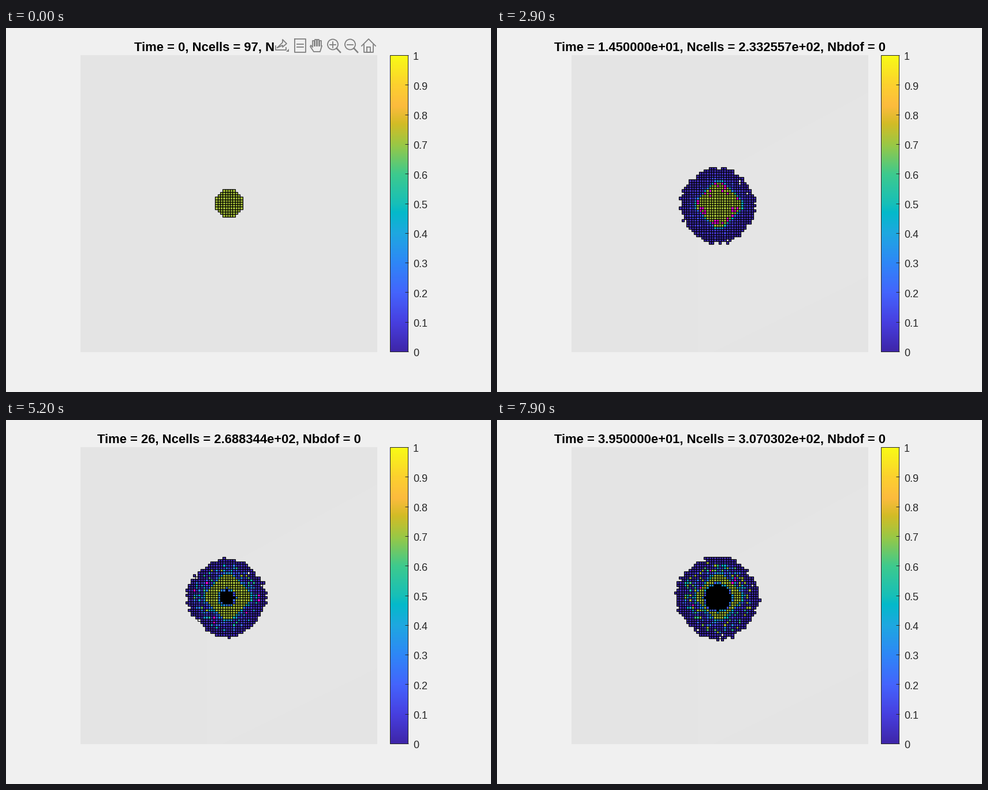
Recreate the animation shown at these times as a matplotlib script. Size 840x630 px, loop 8000 ms.

```python
import numpy as np
import matplotlib.pyplot as plt
from matplotlib.animation import FuncAnimation
from matplotlib.collections import PolyCollection
from matplotlib.colors import LinearSegmentedColormap
from matplotlib.patches import Circle, Polygon, Rectangle

W, H, DPI = 840, 630, 100
FRAMES, INTERVAL, DT = 80, 100, 0.5
PX = 72 / DPI
CX, CY, PITCH, HALF = 386, 304, 514 / 120, 21
INK, GREY = "#262626", "#808080"

parula = LinearSegmentedColormap.from_list("parula_like", [
    (0.0, "#3e26a8"), (0.1, "#473fe0"), (0.2, "#4464fd"), (0.3, "#2e87f7"),
    (0.4, "#1ea8e0"), (0.47, "#04b9ca"), (0.5, "#17bfb8"), (0.6, "#3dca8e"),
    (0.7, "#9ac845"), (0.77, "#d3bc26"), (0.83, "#fdbb3e"), (0.9, "#fcd02f"),
    (1.0, "#f9fb15")])
GREEN = (0.647, 0.753, 0.22, 1)
MAGENTA = (1, 0, 0.9, 1)
BLACK = (0, 0, 0, 1)
WHITE = (1, 1, 1, 1)

# Cell count at a few times
COUNT = [(0, 97), (3, 165), (8.5, 219.7494), (14.5, 233.2557), (18.5, 242.0435),
         (26, 268.8344), (31, 286.1106), (39.5, 307.0302)]

axis = np.arange(-HALF, HALF + 1)
X, Y = np.meshgrid(axis, axis)
RAD, ANG = np.hypot(X, Y), np.arctan2(Y, X)
rng = np.random.default_rng(7)
jitter, dice, level = (rng.random(X.shape) for _ in range(3))
clump = dice + 0.16 * (1 + np.sin(0.9 * X + 1) * np.cos(0.8 * Y))


def square(x, y):
    x0, x1 = (np.round(CX + (x + s) * PITCH) + 0.5 for s in (-0.5, 0.5))
    y0, y1 = (np.round(CY - (y + s) * PITCH) - 0.5 for s in (0.5, -0.5))
    return [(x0, y0), (x1, y0), (x1, y1), (x0, y1)]


SQUARES = np.array([square(x, y) for x, y in zip(X.ravel(), Y.ravel())])


def ramp(t, start, span):
    return np.clip((t - start) / span, 0, 1)


def bell(t, mid, width):
    return np.exp(-((t - mid) / width) ** 2)


def outline(t):
    """Colony radius: fast then slow growth, leaning to the lower left."""
    g = ramp(t, 0, 8.5)
    mean = 5.5 + 8.8 * g ** 0.6 + 0.068 * max(t - 8.5, 0)
    return mean + g * (1.4 * np.cos(ANG - 1.25 * np.pi) + 0.4 * np.cos(4 * ANG)
                       + 1.4 * (jitter - 0.5))


def colony(t):
    """Return the mask of occupied cells and the colour of every cell."""
    depth = outline(t) - RAD

    # The core turns from a disc into a rounded diamond.
    g, d = ramp(t, 0, 8.5), ramp(t, 8, 5)
    p = 2 - 0.7 * d
    c = (np.abs(X + g / 2) ** p + np.abs(Y + g / 2) ** p) ** (1 / p)
    core = 6.5 + 1.2 * g + 1.5 * d
    gap = c - core

    # Sparse shell, with brighter cells appearing over time
    spots = 1.1 * ramp(t, 12, 22) * level ** 4 * np.clip(gap / 2, 0, 1)
    value = 0.02 + 0.1 * np.exp(-np.maximum(gap, 0) / 2)
    value = np.minimum(value + np.where(depth > 2.5, spots, 0), 0.7)
    value = np.where(gap < 1, 0.22 + 0.3 * level, value)
    rgba = parula(value)
    rgba[value >= 0.68] = GREEN
    if t > 20:
        rgba[(depth > 2.5) & ((dice + 0.013 * t) % 1 < 0.022)] = MAGENTA
    if t > 4:
        rgba[(depth > 0.7) & (depth < 1.7) & (dice > 0.98)] = WHITE

    rgba[gap < 0] = GREEN
    odds = 0.8 * bell(t, 7.5, 3.5) + 0.65 * bell(t, 15, 5) * (c / core) ** 2
    rgba[(gap < 0) & (clump < odds)] = MAGENTA

    if t > 17:
        dead = 1.15 * np.sqrt(max(t - 19.5, 0))
        h = np.hypot(X + 0.9, Y + 0.9)
        fringe = h < dead + 1
        rgba[fringe] = parula(0.15 + 0.3 * level[fringe])
        rgba[h < dead] = BLACK
    return (depth > 0).ravel(), rgba.reshape(-1, 4)


def number(x):
    return f"{x:.0f}" if x == int(x) else f"{x:e}"


def caption(t):
    count = np.interp(t, *zip(*COUNT))
    free = 4 if 1 <= t < 10 else 0
    return f"Time = {number(t)}, Ncells = {number(count)}, Nbdof = {free}"


fig = plt.figure(figsize=(W / DPI, H / DPI), dpi=DPI, facecolor="#f0f0f0")
ax = fig.add_axes([0, 0, 1, 1])
ax.axis("off")
ax.add_patch(Rectangle((129, 47), 514, 514, fc="#e4e4e4", lw=0))
shade = ax.add_patch(Polygon(
    [(400, 242), (643, 111), (643, 430), (375, 561), (348, 561), (348, 350)],
    fc="#e5e5e5", lw=0))
cells = ax.add_collection(PolyCollection([], edgecolors="k", linewidths=1.2 * PX,
                                         snap=False, zorder=3))
title = ax.text(386, 39.3, "", ha="center", va="baseline", family="Liberation Sans",
                weight="bold", size=22 * PX, zorder=4)

# Colour bar
ax.imshow(np.linspace(1, 0, 256)[:, None], cmap=parula, vmin=0, vmax=1,
          extent=(665, 697, 561, 47), aspect="auto", interpolation="nearest")
ax.add_patch(Rectangle((665.5, 47.5), 31, 513, fill=False, ec=INK, lw=PX,
                       snap=False, zorder=3))
for k in range(11):
    y = 560.5 - 51.3 * k
    row = np.floor(y) + 0.5
    ax.plot([692, 697], [row, row], color=INK, lw=PX, snap=False, zorder=3)
    ax.text(705, y + 7.8, f"{k / 10:g}", color=INK, family="Liberation Sans",
            size=18 * PX, va="baseline")

# Axes toolbar, visible only at the start
toolbar = [ax.add_patch(Rectangle((465, 18), 177, 28, fc="#f0f0f0", lw=0, zorder=5))]


def stroke(*pts, lw=1.8):
    toolbar.extend(ax.plot(*zip(*pts), color=GREY, lw=lw * PX, zorder=6))


def box(x0, y0, x1, y1):
    stroke((x0, y0), (x1, y0), (x1, y1), (x0, y1), (x0, y0))


stroke((467, 31), (467, 38), (485, 38), (485, 34))
stroke((470, 34), (479, 25), (479, 20), (486, 27), (479, 33), (479, 30), (470, 34))
toolbar.append(ax.add_patch(Polygon([(490, 36), (490, 41), (485, 41)],
                                    fc=GREY, lw=0, zorder=6)))
box(500, 19, 519, 42)
for y in (28, 33):
    stroke((504, y), (515, y))
for k in range(4):
    top = 19 + 2 * abs(k - 1.5)
    stroke((531 + 4 * k, 31), (531 + 4 * k, top), (534 + 4 * k, top), (534 + 4 * k, 31))
stroke((531, 33), (528, 30), (527, 32), (533, 41), (544, 41), (547, 31))
for x in (566, 596):
    toolbar.append(ax.add_patch(Circle((x, 28.5), 9, fill=False, ec=GREY,
                                       lw=1.8 * PX, zorder=6)))
    stroke((x + 6.5, 35), (x + 13, 42), lw=2.5)
    stroke((x - 5, 28.5), (x + 5, 28.5))
stroke((566, 23.5), (566, 33.5))
stroke((616, 31), (628, 19), (640, 31))
stroke((620, 29), (620, 42), (636, 42), (636, 29))
box(625, 33, 631, 42)

ax.set_xlim(0, W)
ax.set_ylim(H, 0)


def update(i):
    t = i * DT
    alive, rgba = colony(t)
    cells.set_verts(SQUARES[alive])
    cells.set_facecolor(rgba[alive])
    title.set_text(caption(t))
    for part in toolbar:
        part.set_visible(i == 0)
    shade.set_visible(i > 0)
    return [cells, title, shade, *toolbar]


anim = FuncAnimation(fig, update, frames=FRAMES, interval=INTERVAL,
                     repeat=True, repeat_delay=0, blit=False)
plt.show()
```
